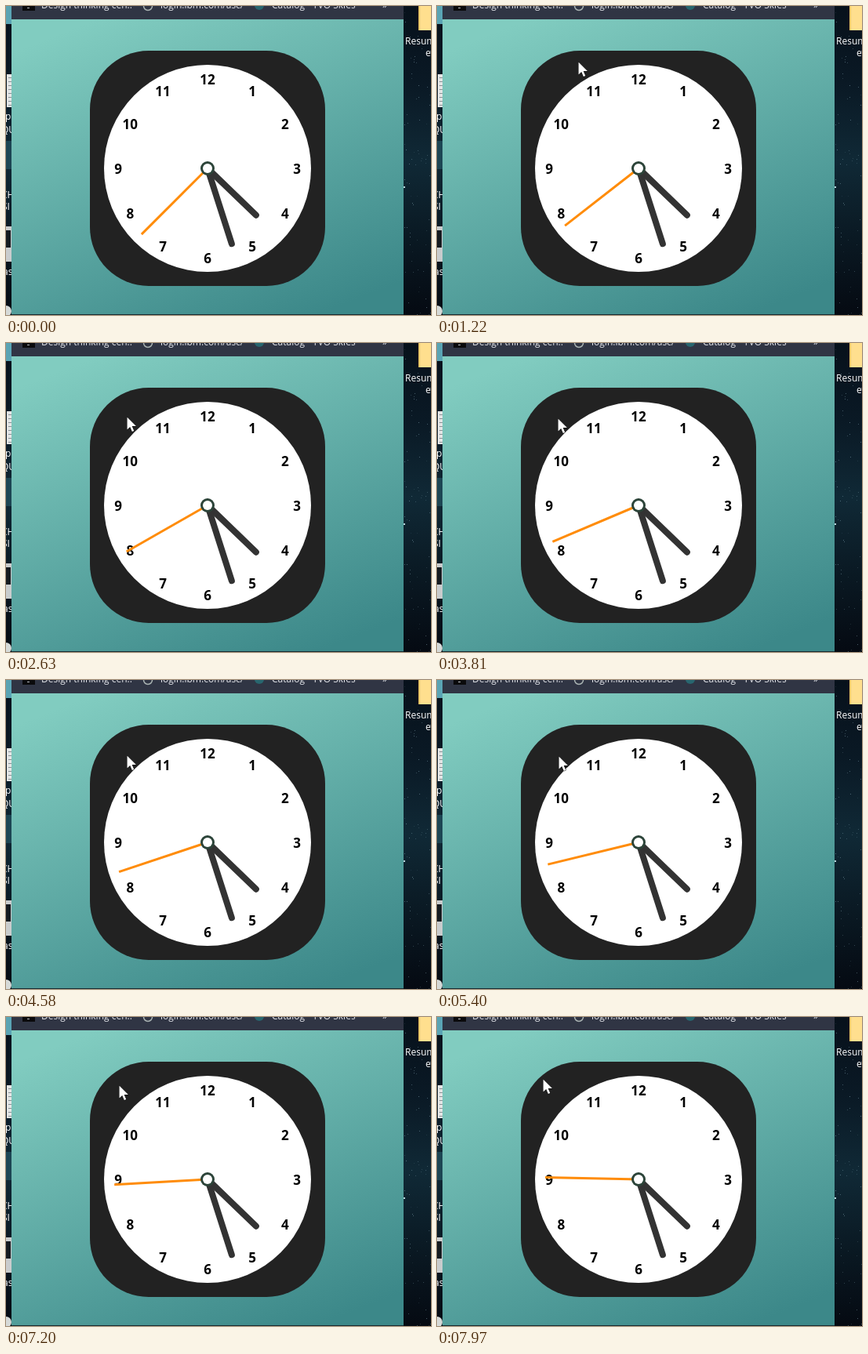
An HTML page with a canvas for the animation above (8 s loop, 542 by 394 pixels).

```html
<!DOCTYPE html>
<html lang="en">
<head>
<meta charset="utf-8">
<title>Clock</title>
<style>
html, body { margin: 0; width: 100%; height: 100%; overflow: hidden; background: #08131c; }
canvas { display: block; }
</style>
</head>
<body>
<canvas id="stage" width="542" height="394"></canvas>
<script>
const ctx = document.getElementById('stage').getContext('2d');
const W = 542, H = 394, LOOP = 8000;
const CX = 257, CY = 207;
const RAD = Math.PI / 180;
const UI = '12px "Open Sans", "Noto Sans", sans-serif';

// Pointer path: time, x, y
const path = [
  [70, 475, 358], [870, 215, 119], [1220, 180, 71], [1680, 154, 93],
  [2630, 154, 94], [2800, 154, 96], [5130, 154, 96], [5300, 155, 97],
  [6850, 155, 97], [7500, 135, 79], [LOOP, 135, 79]
];

function rect(x, y, w, h, color) {
  ctx.fillStyle = color;
  ctx.fillRect(x, y, w, h);
}

function disc(x, y, r, color) {
  ctx.fillStyle = color;
  ctx.beginPath();
  ctx.arc(x, y, r, 0, 2 * Math.PI);
  ctx.fill();
}

function label(text, x, y, color = '#fff') {
  ctx.font = UI;
  ctx.textAlign = 'left';
  ctx.textBaseline = 'alphabetic';
  ctx.fillStyle = color;
  ctx.fillText(text, x, y);
}

function gradient(x0, y0, x1, y1, colors) {
  const g = ctx.createLinearGradient(x0, y0, x1, y1);
  colors.forEach((c, i) => g.addColorStop(i / (colors.length - 1), c));
  return g;
}

function drawDesktop() {
  rect(0, 0, W, H, gradient(0, 0, 0, H, ['#07111b', '#0a1925', '#102936', '#0a1923', '#050a12']));
  let seed = 11;
  const rnd = () => (seed = seed * 16807 % 2147483647) / 2147483647;
  for (let i = 0; i < 75; i++) {
    const x = 508 + Math.floor(rnd() * 34), y = Math.floor(rnd() * H);
    rect(x, y, 1, 1, `rgba(150,185,200,${0.1 + rnd() * 0.4})`);
  }
  rect(507, 230, 2, 2, '#b9d5dc');

  rect(526, 0, 16, 31, '#ffdf8e');
  rect(526, 0, 2, 31, '#f1c766');
  label('Resume', 509, 49);
  label('ev', 535, 64);

  rect(0, 0, 7, 23, '#5aa4b4');
  rect(1, 87, 6, 42, '#e4e6e6');
  for (let y = 91; y < 127; y += 5) rect(3, y, 4, 1, '#8b9295');
  label('p', -1, 145);
  label('QU', -6, 162);
  rect(0, 172, 7, 36, '#1d4654');
  label('CH', -6, 245);
  label('SI', -5, 260);
  rect(0, 281, 7, 45, '#c9cccd');
  rect(0, 286, 6, 22, '#151b20');
  label('as', -4, 343);
  disc(0, 389, 7, '#d6dad8');
}

function drawWindow() {
  rect(7, 17, 500, 376, gradient(175, -6, 339, 416, ['#81ccc0', '#3c8889']));
  rect(7, 393, 500, 1, '#172a30');
  rect(7, 0, 500, 17, '#303544');

  const ink = '#e4e6eb';
  rect(21, 0, 16, 6, '#0a0a0c');
  rect(27, 2, 3, 1, '#b8babf');
  label('Design thinking cen..', 45, 3, ink);
  ctx.strokeStyle = '#a9b3b2';
  ctx.lineWidth = 1.5;
  ctx.beginPath();
  ctx.arc(181, 0, 5.5, 0, 2 * Math.PI);
  ctx.stroke();
  label('login.ibm.com/asc/', 197, 3, ink);
  disc(323, -1, 6, '#28666f');
  label('Catalog - TVO Skies', 339, 3, ink);
  label('»', 480, 3, ink);
}

function drawFace() {
  ctx.fillStyle = '#222';
  ctx.beginPath();
  ctx.roundRect(107, 57, 300, 300, 75);
  ctx.fill();
  disc(CX, CY, 132, '#fff');

  ctx.font = 'bold 17px "Open Sans", "Noto Sans", sans-serif';
  ctx.textAlign = 'center';
  ctx.textBaseline = 'alphabetic';
  ctx.fillStyle = '#000';
  for (let n = 1; n <= 12; n++) {
    const a = n * 30 * RAD;
    ctx.fillText(n, CX + 114 * Math.sin(a), 214 - 114 * Math.cos(a));
  }
}

function drawHand(angle, length, width, color, cap) {
  const a = angle * RAD;
  ctx.strokeStyle = color;
  ctx.lineWidth = width;
  ctx.lineCap = cap;
  ctx.beginPath();
  ctx.moveTo(CX, CY);
  ctx.lineTo(CX + length * Math.sin(a), CY - length * Math.cos(a));
  ctx.stroke();
}

function drawHands(t) {
  drawHand(134, 86, 8, '#333', 'round');
  drawHand(162.2, 101, 8, '#333', 'round');
  drawHand(225 + 5.8 * t / 1000, 119, 3, '#ff8c0a', 'butt');
  disc(CX, CY, 9, '#2c4439');
  disc(CX, CY, 6, '#fff');
}

function drawPointer(t) {
  if (t < path[0][0]) return;
  const i = path.findIndex(p => p[0] > t);
  const [t0, x0, y0] = path[i - 1], [t1, x1, y1] = path[i];
  const k = (t - t0) / (t1 - t0), e = k * k * (3 - 2 * k);
  ctx.save();
  ctx.translate(Math.round(x0 + (x1 - x0) * e) + 0.5, Math.round(y0 + (y1 - y0) * e) + 0.5);
  ctx.fillStyle = '#fff';
  ctx.strokeStyle = '#000';
  ctx.lineWidth = 1;
  ctx.stroke(arrow);
  ctx.fill(arrow);
  ctx.restore();
}

const arrow = new Path2D('M0 0V16L3.7 12.5L6.3 18.5L8.8 17.4L6.2 11.6H11.5Z');

function frame(now) {
  const t = now % LOOP;
  drawDesktop();
  drawWindow();
  drawFace();
  drawHands(t);
  drawPointer(t);
  requestAnimationFrame(frame);
}
requestAnimationFrame(frame);
</script>
</body>
</html>
```
